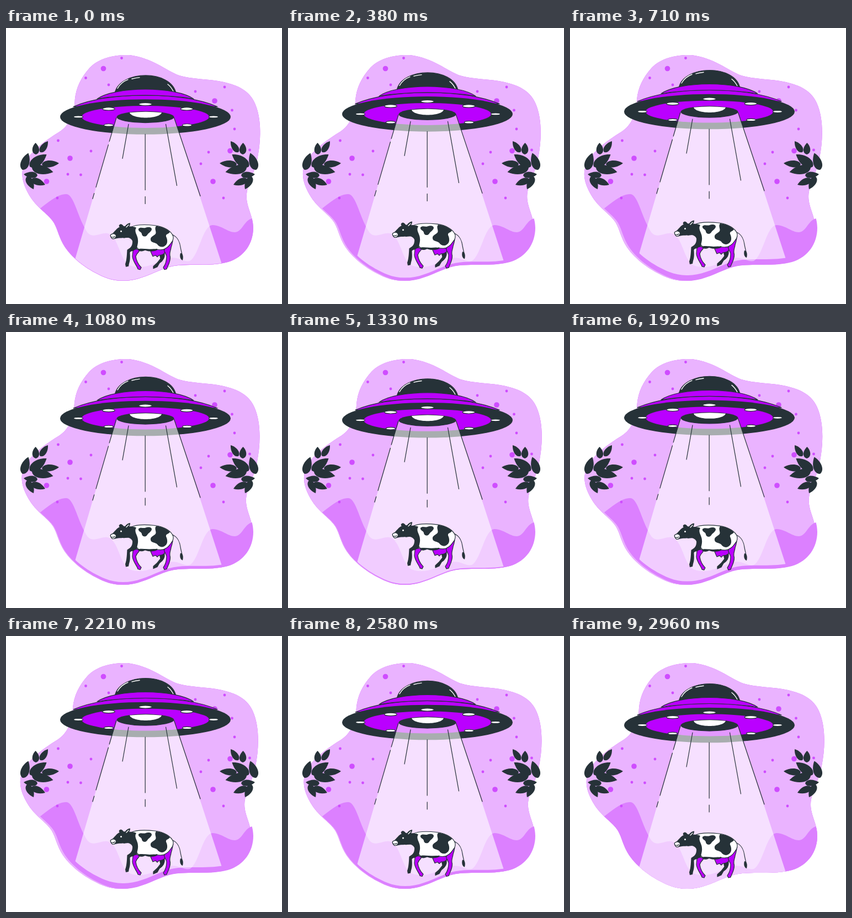
Write an HTML page that moves like this. It is 500 px wide and 500 px high and loops after 3 s.

```html
<!DOCTYPE html>
<html lang="en">
<head>
<meta charset="utf-8">
<title>Cow abduction</title>
<style>
  html, body { margin: 0; width: 100%; height: 100%; overflow: hidden; background: #fff; }
  svg { display: block; width: 100%; height: 100%; }
  .dark { fill: #263238; }
  .purple { fill: #ba00ff; }
  .white { fill: #fff; }
  .ink { stroke: #263238; stroke-width: 1.2; stroke-linejoin: round; stroke-linecap: round; }
  .line { fill: none; }
  .shine { fill: none; stroke: #fff; stroke-width: 1.4; stroke-linecap: round; }
</style>
</head>
<body>
<svg viewBox="0 0 500 500">
  <defs>
    <path id="shape" d="M224 49C196 48 168 55 152 72C136 90 127 108 125 130C124 160 112 180 94 190
      C68 206 43 226 34 246C25 264 31 285 45 307C58 327 78 338 87 353C94 365 96 380 107 397
      C122 419 150 440 180 452C200 460 224 460 246 452C268 445 288 432 312 430C340 427 372 432 402 424
      C432 415 448 390 448 362C448 340 436 325 436 305C437 280 452 262 456 235C462 205 464 165 451 136
      C441 113 420 104 395 98C368 92 336 93 314 86C290 77 265 54 224 49Z"/>
    <clipPath id="inside"><use href="#shape"/></clipPath>
  </defs>

  <g id="blob">
    <use href="#shape" class="purple"/>
    <use href="#shape" class="white" opacity=".7"/>
  </g>

  <g clip-path="url(#inside)">
    <path fill="#dc80ff" d="M44 340C75 318 92 300 110 301C124 303 130 345 148 371C158 382 172 370 184 372
      C204 376 206 422 224 430C250 440 272 424 296 417C312 413 322 425 333 422C350 412 356 358 374 357
      C392 358 402 370 414 370C430 370 432 342 452 345L460 480H44Z"/>
  </g>

  <g id="dots" fill="#cf4dff"></g>
  <g id="plant" class="dark"></g>
  <use href="#plant" transform="translate(483 0) scale(-1 1)"/>

  <g id="ufo">
    <path class="dark ink" d="M197 119C201 97 228 86.5 253 86.5S304 97 308 119Z"/>
    <path class="shine" d="M202 110C206 103 213 97 221 94M228 92.8Q235 90.8 242 90.2M293 102.500Q299 107 303 115"/>
    <path class="purple ink" d="M122 143C160 127 205 122.500 252.500 122.500S345 127 383 143Z"/>
    <path class="purple ink" d="M165 129C180 118 215 111.500 252.500 111.500S325 118 340 129
      C310 124 280 122.500 252.500 122.500S195 124 165 129Z"/>
    <ellipse class="dark" cx="252.500" cy="161.500" rx="154.500" ry="31.800"/>
    <ellipse class="purple" cx="252.500" cy="161.500" rx="115.500" ry="20"/>
    <g id="lights" class="white ink"></g>
    <ellipse class="dark" cx="252.500" cy="162" rx="52" ry="10.700"/>
    <path class="white" d="M224 153.800Q253 150.800 282 153.800C280 160 266 163 253 163S226 160 224 153.800Z"/>
    <path class="white" opacity=".6" clip-path="url(#inside)"
      d="M200.500 162A52 10.700 0 0 0 304.500 162L401 459H113.500Z"/>
    <path class="line ink" d="M200 163L187.200 206M185.500 212L163 289M159.800 300L156.900 310
      M304.500 163L352 305M222 175L211 237M252.200 193V294M252.200 306V319M289.500 175L309.500 286"/>
  </g>

  <g id="cow">
    <path class="line ink" stroke-width="2" d="M302 375C311 379 315 389 316 397C317 403 318 406 319 411"/>
    <path class="dark" d="M316 408C320 408 322 414 320 421C316 420 314 414 316 408Z"/>
    <path class="dark ink" d="M278 409L287 409C288 416 284 422 278 426L274 433L267 436L267 432C272 428 276 424 280 418Z"/>
    <path class="dark" d="M229 388C232 396 238 400 234 404C227 404 224.500 405 224.500 408C225 416 225 421 223 427L222 432
      L217 433L216 428C219 420 219 408 219.500 402C224 399 229 397 229 388Z"/>
    <path class="purple ink" d="M262 405C268 401 282 399 290 403C288 411 282 412 277 412L274 415L271 412L266 414Z"/>
    <path class="white ink" d="M226 361C236 356 252 356 270 358C286 360 300 368 303 378C304 386 298 393 294 397
      C286 404 276 402 268 401C258 402 248 402 240 401C232 394 230 384 228 378Z"/>
    <path class="dark" d="M212 360C222 360 230 359 236 362C231 369 239 376 239 384C240 392 236 396 238 403
      C232 400 229 394 229 386C226 380 220 379 213 381Z"/>
    <path class="dark" d="M240 364C244 360 249 364 253 362C258 360 264 361 264 365C263 370 258 371 256 375
      C253 380 246 378 246 373C245 369 239 369 240 364Z"/>
    <path class="dark" d="M272 359C282 360 292 364 297 370C294 374 289 373 290 378C293 384 293 391 289 394
      C284 399 277 397 274 392C270 388 263 390 262 384C261 378 268 377 271 373C273 369 268 364 272 359Z"/>
    <path class="dark" d="M236 402C246 397 262 404 274 400C277 404 262 407 252 403C246 406 240 405 236 402Z"/>
    <path class="purple ink" d="M302 386C298 390 296 397 288 400C284 404 290 408 291 414C291 422 288 430 285 434
      L287 438L291 437C293 431 298 424 297.500 415C295 408 299 402 299 398Q301 392 302 386Z"/>
    <path class="purple ink" d="M230 404C234 399 242 401 241 405C238 408 236 411 235 414C236 421 239 428 245 434
      L243 438L239 437C238 432 230 424 229 414Z"/>
    <path class="dark ink" d="M215 362C217 357 220 355 224.500 354C224 359 221 363 216 364ZM207 361C204 359 205 357 208 356Q212 357 213 361Z"/>
    <path class="dark" d="M208 360C214 357 220 361 225 366L222 380C212 381 204 380 198 382C192 384 188 380 190 375
      C197 370 200 362 208 360Z"/>
    <path class="white ink" d="M189.500 375C193 372 197 372 199.500 376C200 380 196 383 192.500 382C192 380 188 378 189.500 375Z"/>
    <path class="line ink" d="M192 379Q195 380 197 378"/>
    <path class="shine" stroke-width="1" d="M218 361L222 357"/>
    <circle class="white" cx="208.500" cy="368.500" r="1.500"/>
  </g>
</svg>
<script>
const byId = id => document.getElementById(id);
const fill = (id, list, draw) => byId(id).innerHTML = list.map(item => draw(...item)).join('');

const big = [[176.5, 73.5], [116, 236], [73.5, 278], [378, 132], [406, 222.5], [375, 278]];
const small = [[209.5, 54.5], [144.5, 90.5], [186, 103], [94.5, 204], [154, 223], [112, 265], [135.5, 266],
  [93, 308], [396, 107], [343, 115], [409.5, 149], [414, 183], [441.5, 221], [367, 225], [353, 246], [394, 308]];
fill('dots', [...big.map(p => [...p, 4.8]), ...small.map(p => [...p, 2.4])],
  (x, y, r) => `<circle cx="${x}" cy="${y}" r="${r}"/>`);

fill('lights', [[252.5, 138.5, 12, 2.6], [186, 147, 11.3, 2.7], [327.5, 147, 11.3, 2.7], [131, 161.5, 8.5, 2],
  [376, 161.5, 8.5, 2], [186, 176.5, 8.5, 2.2], [328, 176.5, 8.5, 2.2]],
  (x, y, rx, ry) => `<ellipse cx="${x}" cy="${y}" rx="${rx}" ry="${ry}"/>`);

// Leaf from base to tip, widest nearer the base
function leaf(x, y, tipX, tipY, width) {
  const dx = tipX - x, dy = tipY - y, len = Math.hypot(dx, dy);
  const at = (along, side) =>
    `${x + dx * along - dy / len * width * side} ${y + dy * along + dx / len * width * side}`;
  return `<path d="M${x} ${y}C${at(.1, .7)} ${at(.6, .7)} ${tipX} ${tipY}C${at(.65, -.65)} ${at(.1, -.7)} ${x} ${y}Z"/>`;
}
fill('plant', [[62, 225, 76, 205, 11], [54, 229, 53.5, 208, 12], [30, 257, 40.5, 226.5, 15], [43, 251, 73.5, 229, 17],
  [65, 247, 96, 245, 12], [47, 253, 85.5, 261, 16], [57, 267, 32, 265, 11], [46, 274, 71, 284, 12],
  [38, 269, 50, 292, 12]], leaf);

const SHAKE = [0, -1, 2, -4, 4, -4, 4, -4, 2, -1, 0];
const lift = phase => -10 * (1 - Math.abs(1 - 2 * phase));
function shake(phase) {
  const pos = phase * 10, i = Math.floor(pos);
  return SHAKE[i] + (SHAKE[i + 1] - SHAKE[i]) * (pos - i);
}
const move = (id, x, y) => byId(id).setAttribute('transform', `translate(${x} ${y})`);

function frame() {
  const time = performance.now() + 40;
  const fast = time % 1500 / 1500;
  move('blob', shake(fast), 0);
  move('ufo', 0, lift(fast));
  move('cow', 0, lift(time % 3000 / 3000));
  requestAnimationFrame(frame);
}
frame();
</script>
</body>
</html>
```
